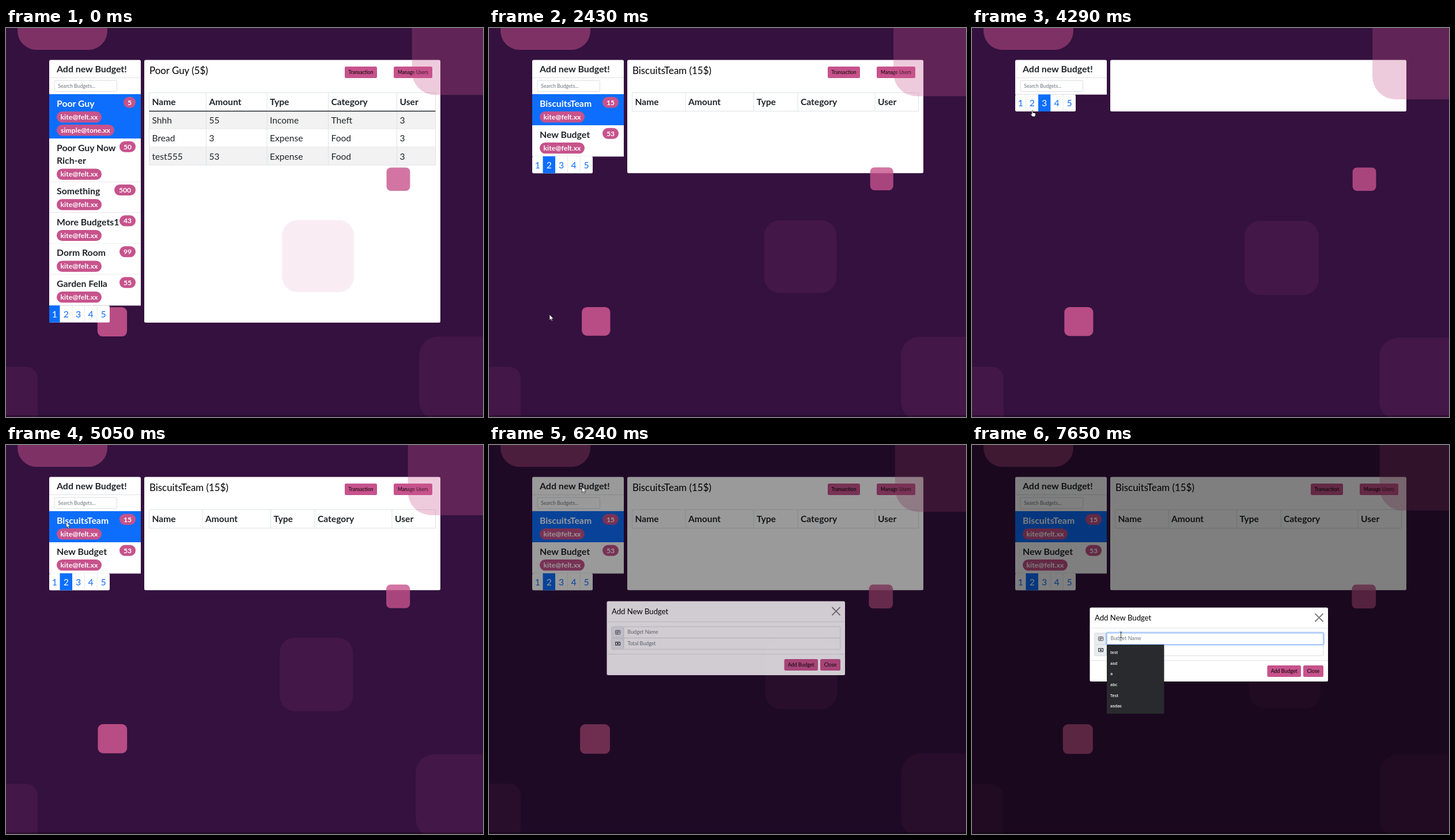
Write an HTML page that moves like this. It is 828 px wide and 676 px high and loops after 8000 ms.

```html
<!DOCTYPE html>
<html lang="en">
<head>
<meta charset="utf-8">
<title>Budget manager</title>
<style>
html, body { margin: 0; width: 100%; height: 100%; overflow: hidden; background: #34113f; }
svg { display: block; width: 828px; height: 676px; font-family: Lato, sans-serif; }
</style>
</head>
<body>
<svg id="stage" viewBox="0 0 828 676" xmlns="http://www.w3.org/2000/svg"></svg>
<script>
const LOOP = 8000;
const PINK = '#c7538c', BLUE = '#0d6efd', INK = '#212529', LINE = '#dee2e6';
const stage = document.getElementById('stage');

// markup helpers
const rect = (x, y, w, h, fill, r = 0, more = '') =>
  `<rect x="${x}" y="${y}" width="${w}" height="${h}" rx="${r}" fill="${fill}" ${more}/>`;
const box = (x, y, w, h, r = 0, fill = '#fff', stroke = '#ced4da') =>
  rect(x, y, w, h, fill, r, `stroke="${stroke}" stroke-width=".8"`);
const text = (s, x, y, size, fill = INK, more = '') =>
  `<text x="${x}" y="${y}" font-size="${size}" fill="${fill}" ${more}>${s}</text>`;
const path = (d, stroke = LINE, width = 1, more = '') =>
  `<path d="${d}" fill="none" stroke="${stroke}" stroke-width="${width}" ${more}/>`;
const group = (id, body) => `<g id="${id}">${body}</g>`;
const BOLD = 'font-weight="700"', MID = 'text-anchor="middle"';

const button = (s, x, y, w, size) =>
  rect(x, y, w, 20, PINK, 2.5) + text(s, x + w / 2, y + 13, size, '#000', MID);

const MAIL = 'kite@felt.xx', MAIL2 = 'simple@tone.xx';

function item(top, h, lines, count, mails, active, id = '') {
  const countW = [0, 21, 28, 37][String(count).length];
  const first = top + 30 + 22.5 * (lines.length - 1);
  let s = rect(75, top, 159, h, active ? BLUE : '#fff', 0, id && `id="${id}"`);
  if (!active) s += path(`M75 ${top + h}H234`);
  lines.forEach((l, i) => {
    s += text(l, 88, top + 21.7 + 22.5 * i, 15.8, active ? '#fff' : INK,
      BOLD + (id && ` id="${id}Text"`));
  });
  s += rect(225 - countW, top + 4.7, countW, 19, PINK, 9.5) +
    text(count, 225 - countW / 2, top + 18.5, 12.2, '#fff', BOLD + ' ' + MID);
  mails.forEach((m, i) => {
    const w = m === MAIL2 ? 100 : 78, y = first + 23 * i;
    s += rect(88, y, w, 19.2, PINK, 9.6) +
      text(m, 88 + w / 2, y + 13.9, 12.2, '#fff', BOLD + ' ' + MID);
  });
  return s;
}

function pager(top, active) {
  const edges = [75, 93.5, 115, 136.3, 158, 180];
  let s = rect(75, top, 105, 29.5, '#fff', 2.5);
  for (let i = 0; i < 5; i++) {
    const on = i + 1 === active, a = edges[i], b = edges[i + 1];
    s += on ? rect(a, top, b - a, 29.5, BLUE) : '';
    if (i && !on && i !== active) s += path(`M${a} ${top}v29.5`, LINE, .8);
    s += text(i + 1, (a + b) / 2, top + 20.6, 15.8, on ? '#fff' : BLUE, MID);
  }
  return s;
}

function table(cols, rows) {
  const bottom = rows.length ? 238.3 : 144.5;
  const put = (cells, y, more) =>
    cells.map((c, i) => text(c, cols[i] + 5, y, 15.6, INK, more)).join('');
  let s = '';
  rows.forEach((r, i) => {
    const y = 144.5 + i * 31.2;
    s += rect(248.5, y, 497, 31.2, i % 2 ? '#fff' : '#f2f2f2') +
      path(`M248.5 ${y + 31.2}h497`) + put(r, y + 21.6, '');
  });
  s += cols.concat(745.5).map(x => path(`M${x} 112.5V${bottom}`)).join('');
  s += path('M248.5 112.5h497') + put(['Name', 'Amount', 'Type', 'Category', 'User'], 134.2, BOLD);
  return s + path('M248.5 144.5h497', rows.length ? INK : LINE, rows.length ? 1.3 : 1);
}

const panel = h => rect(240, 55.5, 514, h - 55.5, '#fff', 2.5);
const detail = (title, h, cols, rows) => panel(h) +
  text(title, 249, 79.5, 16.9, '#000') +
  button('Transaction', 588, 67, 56, 8.5) + button('Manage Users', 673, 67, 67, 8.5) +
  table(cols, rows);

const page1 = item(115, 77, ['Poor Guy'], 5, [MAIL, MAIL2], true) +
  item(192, 75.3, ['Poor Guy Now', 'Rich-er'], 50, [MAIL]) +
  item(267.3, 53.6, ['Something'], 500, [MAIL]) +
  item(320.9, 53.6, ['More Budgets1'], 43, [MAIL]) +
  item(374.5, 53.6, ['Dorm Room'], 99, [MAIL]) +
  item(428.1, 53.9, ['Garden Fella'], 55, [MAIL], false, 'garden') +
  pager(482.2, 1) +
  detail('Poor Guy (5$)', 512, [248.5, 347.5, 453, 559.5, 678.5], [
    ['Shhh', 55, 'Income', 'Theft', 3],
    ['Bread', 3, 'Expense', 'Food', 3],
    ['test555', 53, 'Expense', 'Food', 3]]);

const page2 = item(115, 54, ['BiscuitsTeam'], 15, [MAIL], true) +
  item(169, 54, ['New Budget'], 53, [MAIL]) +
  pager(223, 2) +
  detail('BiscuitsTeam (15$)', 252.3, [248.5, 341, 459.5, 536, 670], []);

const page3 = pager(115.5, 3) + panel(145);

const sideTop = rect(75, 55.5, 159, 34, '#fff', 2.5, 'id="addRow"') +
  rect(75, 86.5, 159, 29, '#fff') + path('M75 86.5H234M75 115.2H234') +
  text('Add new Budget!', 88, 77, 15.9, INK, BOLD) +
  box(84, 91.2, 108.5, 19.3, 2) + text('Search Budgets...', 90.3, 103.7, 8.7, '#6c757d');

const field = (y, label) => box(212.7, y, 21.3, 19.7, 2, '#e9ecef') +
  box(234, y, 375.8, 19.7, 2) + text(label, 240.5, y + 12.6, 8.9, '#6c757d');

const modal = rect(204.5, 282.5, 413.5, 128.5, '#fff', 2.5) +
  text('Add New Budget', 213, 305, 13.15, '#000') +
  path('M595.5 293l14 14m0 -14l-14 14', '#7d7d7d', 2) +
  path('M204.5 318.2h413.5M204.5 374.6h413.5') +
  field(326.8, 'Budget Name') + field(346.5, 'Total Budget') +
  box(219.5, 333.3, 8.2, 6.6, 1, 'none', INK) +
  path('M221 335.2h5.2m-5.2 1.5h5.2m-5.2 1.5h3', INK, .7) +
  rect(219.2, 353, 8.8, 6.4, INK, .6) + rect(220.2, 354, 6.8, 4.4, '#e9ecef', 1.2) +
  `<circle cx="223.6" cy="356.2" r="1.5" fill="${INK}"/>` +
  button('Add Budget', 512.5, 383, 58.5, 8.9) + button('Close', 575, 383, 35, 8.9) +
  group('focus',
    rect(232.8, 325.6, 378.2, 22, 'none', 3, 'stroke="#0d6efd" stroke-opacity=".25" stroke-width="2.4"') +
    box(234, 326.8, 375.8, 19.7, 2, 'none', '#86b7fe')) +
  rect(240, 331, 1, 10, '#000', 0, 'id="caret"');

const menu = rect(234, 347, 99.5, 120, '#292a2d', 1) +
  ['test', 'asd', 'a', 'abc', 'Test', 'asdas'].map((s, i) =>
    text(s, 240, 363 + i * 18.65, 7.2, '#fff',
      'font-family="Open Sans, sans-serif" font-weight="600"')).join('');

const arrow = '<path d="M0 0V9.6L2.3 7.6L3.8 11L5.4 10.3L3.9 7H7Z" fill="#fff" stroke="#222" stroke-width=".7"/>';
const hand = '<path d="M-.6 .8Q.4 -.6 1.2 .8V4.2L5 5Q6.1 5.4 5.8 7L5 11H.4L-2.8 7Q-2.6 5.6 -.6 7Z" fill="#fff" stroke="#222" stroke-width=".7"/>';
const beam = path('M-2 -5H-.6Q0 -5 0 -4.4Q0 -5 .6 -5H2M0 -4.4V4.4M-2 5H-.6Q0 5 0 4.4Q0 5 .6 5H2', '#222', .9);

const tile = (id, r, o) => rect(0, 0, 0, 0, PINK, r, `id="${id}" opacity="${o}"`);

stage.innerHTML = rect(0, 0, 828, 676, '#34113f') +
  rect(20, -80, 156, 118, PINK, 33, 'opacity=".5"') +
  tile('lowLeft', 20, .1) + tile('lowRight', 33, .1) + tile('pinkLeft', 9, .9) +
  rect(0, 673, 828, 3, '#000', 0, 'opacity=".3"') +
  group('side', sideTop) + group('page1', page1) + group('page2', page2) + group('page3', page3) +
  tile('pinkRight', 7.5, .8) + tile('topRight', 40, .3) + tile('center', 27, .1) +
  rect(0, 0, 828, 676, '#000', 0, 'id="shade"') +
  group('modal', modal) + group('menu', menu) +
  group('cursor', group('arrow', arrow) + group('hand', hand) + group('beam', beam));

const el = {};
stage.querySelectorAll('[id]').forEach(n => el[n.id] = n);
const show = (id, on) => el[id].style.display = on ? '' : 'none';
const clamp = x => Math.max(0, Math.min(1, x));
const wave = (t, peak, period) => Math.cos(2 * Math.PI * (t - peak) / period);

function place(id, left, top, right, bottom) {
  const n = el[id];
  n.setAttribute('x', left);
  n.setAttribute('y', top);
  n.setAttribute('width', right - left);
  n.setAttribute('height', bottom - top);
}

// pointer stops: time, x, y, look on the way to the next stop
const stops = [
  [1450, 222, 428, 'beam'], [1570, 157.5, 447, 'beam'], [1700, 157.5, 447, 'beam'],
  [1980, 105, 497, 'hand'], [2220, 105, 498, 'arrow'], [2900, 105, 498, 'arrow'],
  [3350, 125, 236, 'hand'], [3800, 125, 236, 'arrow'], [4130, 104.5, 143, 'hand'],
  [4570, 104.5, 143, 'hand'], [4750, 104.5, 134, 'hand'], [5000, 104.5, 134, 'arrow'],
  [5600, 104.5, 134, 'arrow'], [6000, 161.5, 73, 'arrow'], [6500, 161.5, 73, 'arrow'],
  [7000, 258.5, 330, 'beam'], [LOOP, 258.5, 330, 'beam']
];

function pointer(t) {
  if (t < stops[0][0]) return null;
  const i = stops.findIndex(s => s[0] > t);
  const [t0, x0, y0, look] = stops[i - 1], [t1, x1, y1] = stops[i];
  const k = (t - t0) / (t1 - t0), e = k * k * (3 - 2 * k);
  return { x: x0 + (x1 - x0) * e, y: y0 + (y1 - y0) * e, look };
}

function drawTiles(t) {
  const a = wave(t, 1000, 6200), b = wave(t, 2200, 9000);
  const c = wave(t, 2800, 9000), d = wave(t, -100, 3000);
  const slide = clamp((t - 6240) / 850);
  place('topRight', 701.3 + 6.3 * a, -90, 910, 119 - 5.1 * a);
  place('center', 477.1 + 4.1 * a, 334.2 - .8 * a, 603.4 + 1.4 * a, 460.8 - 3.2 * a);
  place('pinkRight', 660.5 + 1.15 * b, 242.4 - .2 * b, 701.4 + .35 * b, 283 - b);
  place('pinkLeft', 159.4 + 1.7 * c, 485.1 - .2 * c, 210.2 + .3 * c, 535.7 - 1.1 * c);
  place('lowRight', 712 + 5.2 * d, 537 - d, 862, 682);
  place('lowLeft', -60, 588.7 + slide, 55 - 1.7 * slide, 720);
}

function draw(t) {
  drawTiles(Math.min(t, 7090));

  const page = t < 2220 ? 1 : t >= 3500 && t < 5000 ? 3 : 2;
  for (let i = 1; i <= 3; i++) show('page' + i, page === i);

  const p = pointer(t);
  show('cursor', p);
  if (p) {
    el.cursor.setAttribute('transform', `translate(${p.x} ${p.y})`);
    ['arrow', 'hand', 'beam'].forEach(k => show(k, k === p.look));
  }
  const over = (y0, y1) => p && p.x > 75 && p.x < 234 && p.y > y0 && p.y < y1;
  const onGarden = over(428, 482);
  el.garden.setAttribute('fill', onGarden ? '#f8f9fa' : '#fff');
  el.gardenText.setAttribute('fill', onGarden ? '#495057' : INK);
  el.addRow.setAttribute('fill', t < 6130 && over(55.5, 86.5) ? '#e9ecef' : '#fff');

  // dialog fades in while it drops
  const fade = clamp((t - 6130) / 140);
  const drop = 41 * Math.pow(1 - clamp((t - 6080) / 300), 1.7);
  show('shade', fade);
  show('modal', fade);
  el.shade.setAttribute('opacity', fade * .5);
  el.modal.setAttribute('opacity', fade);
  el.modal.setAttribute('transform', `translate(0 ${-drop})`);

  el.focus.setAttribute('opacity', clamp((t - 7110) / 150));
  show('caret', t >= 7150 && t < 7650);
  show('menu', t >= 7230);
}

function tick() {
  draw(performance.now() % LOOP);
  requestAnimationFrame(tick);
}
tick();
</script>
</body>
</html>
```
